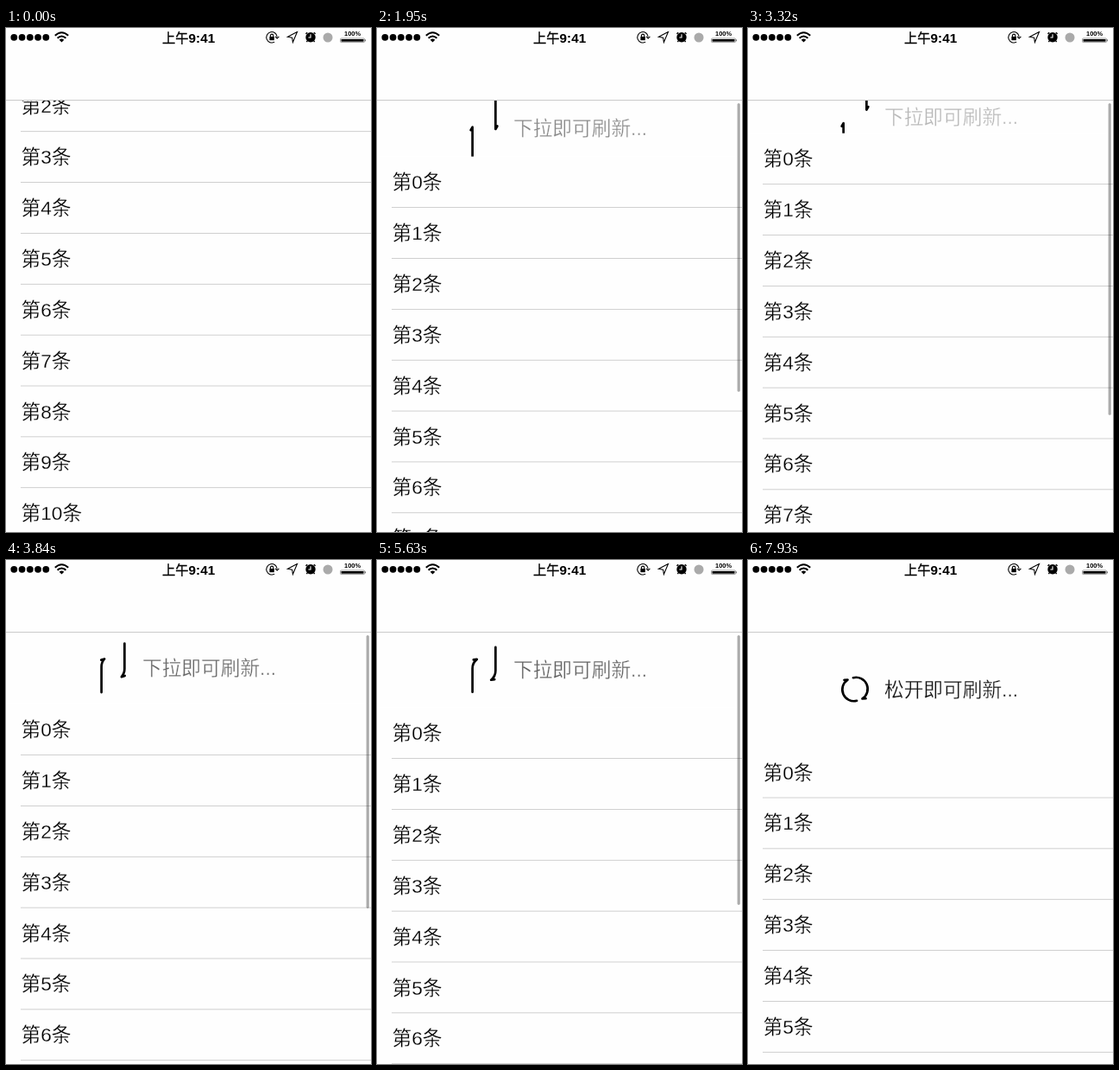
Write an HTML page that moves like this. It is 423 px wide and 583 px high and loops after 7990 ms.

```html
<!DOCTYPE html>
<html lang="zh">
<head>
<meta charset="utf-8">
<style>
html, body { margin: 0; width: 100%; height: 100%; overflow: hidden; background: #fefefe; }
svg { display: block; width: 423px; height: 583px; }
/* the pale outline thins the strokes */
text {
  font: 300 22.7px "Liberation Sans", "Noto Sans CJK SC Light", "Noto Sans CJK SC DemiLight", "Noto Sans CJK SC", "Noto Sans CJK", sans-serif;
  fill: #000; stroke: #fefefe; stroke-width: .3px;
}
.time { font-size: 15.3px; font-weight: 500; stroke: #000; }
.time tspan { font-weight: bold; stroke: none; }
.charge { font: bold 7.4px "Liberation Sans", sans-serif; stroke: none; }
.ink { fill: none; stroke: #000; }
</style>
</head>
<body>
<svg viewBox="0 0 423 583">
  <rect width="423" height="583" fill="#fefefe"/>
  <g id="icon" class="ink" stroke-width="2.7" stroke-linecap="round" stroke-linejoin="round">
    <path id="half"/>
    <use href="#half" transform="rotate(180)"/>
  </g>
  <text id="label" x="158"></text>
  <g id="list"><rect id="sheet" width="423" height="1400" fill="#fefefe"/></g>
  <rect id="bar" x="417.6" width="3.2" rx="1.6" fill="#000"/>

  <rect width="423" height="83" fill="#fefefe"/>
  <rect y="83" width="423" height="1" fill="#cbcbcb"/>
  <g id="signal"></g>
  <g class="ink" stroke-width="2">
    <path d="M56.8 8.8Q64.5 1.8 72.2 8.8M59.6 11.7Q64.5 7.3 69.4 11.7"/>
    <path d="M61.7 13.7Q64.5 11.3 67.3 13.7L64.5 16.5Z" fill="#000" stroke="none"/>
  </g>
  <text class="time" x="181" y="16.6">上午<tspan>9:41</tspan></text>
  <g class="ink" stroke-width="1.1">
    <path d="M311.2 16.1A6.2 6.2 0 1 1 314.2 10.3M312 9.8L314.2 12L316.4 9.8"/>
    <path d="M306.4 10.2V8.8A1.7 1.7 0 0 1 309.8 8.8V10.2"/>
    <rect x="305.4" y="10" width="5.4" height="4.2" fill="#000" stroke="none"/>
    <path d="M337.4 4.6L326.4 10.3L331.6 11.2L332.4 16.4Z"/>
  </g>
  <circle cx="353" cy="10.7" r="5.7"/>
  <path class="ink" stroke-width="1.5" d="M347.4 6.8L349.2 5.2M358.6 6.8L356.8 5.2M349.2 15L348.4 16.2M356.8 15L357.6 16.2"/>
  <path d="M353 7.2V11H350.4" fill="none" stroke="#fff" stroke-width="1.1"/>
  <circle cx="373" cy="11" r="5.5" fill="#aaa"/>
  <text class="charge" x="401.5" y="9" text-anchor="middle">100%</text>
  <rect x="387.5" y="12" width="28" height="4.6" rx="1" class="ink" stroke-width=".7" style="stroke:#777"/>
  <rect x="388.5" y="13" width="26" height="2.7"/>
  <rect x="416" y="13.3" width="1" height="2" fill="#777"/>
</svg>
<script>
const LOOP = 7990, TOP = 83, ROW = 58.86, PT = 1.338;
const PULL = 99 * PT, RADIUS = 10 * PT, SPACE = PT, LINE = 30 * PT, TRAVEL = 22, BARB = 3 * PT;
const RELEASE = 6950;

// [time, pull distance]; negative means scrolled into the list
const path = [
  [0, -140], [500, -140], [760, -75], [1000, -22], [1320, 0], [1670, 0], [1950, 65.5], [2290, 98],
  [2700, 28.6], [2900, 18], [3840, 83.5], [4160, 104], [4840, 28], [5630, 87.5], [5690, 91.5],
  [6600, 160.5], [6800, 168], [RELEASE, 168], [7290, 133], [LOOP, 133]
];

const $ = id => document.getElementById(id);
const clamp = v => Math.max(0, Math.min(1, v));

function add(parent, tag, attrs, text = '') {
  const el = document.createElementNS('http://www.w3.org/2000/svg', tag);
  set(el, attrs);
  el.textContent = text;
  return parent.appendChild(el);
}

function set(el, attrs) {
  for (const key in attrs) el.setAttribute(key, attrs[key]);
}

for (let i = 0; i < 5; i++) add($('signal'), 'circle', { cx: 9.3 + i * 9.25, cy: 10.8, r: 3.9 });

const rows = Array.from({ length: 14 }, (_, i) => ({
  text: add($('list'), 'text', { x: 17.5 }, `第${i}条`),
  line: add($('list'), 'rect', { x: 17, width: 406, height: 0.8, fill: '#c4c4c4' })
}));

// Monotone cubic through the points
function grade(i) {
  const [t, p] = path[i];
  return (path[i + 1][1] - p) / (path[i + 1][0] - t);
}

function slope(i) {
  if (i === 0 || i === path.length - 1) return 0;
  const a = grade(i - 1), b = grade(i);
  return a * b <= 0 ? 0 : 2 * a * b / (a + b);
}

function pullAt(t) {
  let i = 0;
  while (i < path.length - 2 && t >= path[i + 1][0]) i++;
  const [t0, p0] = path[i], [t1, p1] = path[i + 1];
  const d = t1 - t0, u = (t - t0) / d, v = 1 - u;
  return p0 * v * v * (1 + 2 * u) + p1 * u * u * (3 - 2 * u)
    + d * u * v * (slope(i) * v - slope(i + 1) * u);
}

// A line that slides in, then bends into an arc
function halfPath(g) {
  const slide = Math.max(0, 1 - 2 * g) * TRAVEL;
  const bend = Math.max(0, 2 * g - 1);
  const turn = bend * Math.PI * 0.9;
  const y = slide - SPACE;
  const endX = -RADIUS * Math.cos(turn), endY = y - RADIUS * Math.sin(turn);
  const tilt = Math.PI / 3 - turn;
  const arc = bend ? `A${RADIUS} ${RADIUS} 0 0 1 ${endX} ${endY}` : '';
  return `M${-RADIUS} ${y + LINE * (1 - bend)}V${y}${arc}`
    + `L${endX - BARB * Math.cos(tilt)} ${endY + BARB * Math.sin(tilt)}`;
}

function spinAt(t, p) {
  if (t < RELEASE) return Math.max(0, p - PULL) / PT;
  const start = (168 - PULL) / PT;
  return start + (435 - start) * (t - RELEASE) / (7930 - RELEASE);
}

function barAlpha(t) {
  if (t < 500) return 0;
  if (t < 1670) return clamp((1490 - t) / 170);
  return clamp((7600 - t) / 250);
}

function draw(t) {
  const p = pullAt(t), g = clamp(p / PULL), mid = TOP + p / 2;

  $('half').setAttribute('d', halfPath(g));
  set($('icon'), { transform: `translate(124 ${mid}) rotate(${spinAt(t, p)})` });
  set($('label'), { y: mid + 8.3, opacity: g * 0.92 });
  $('label').textContent = g >= 1 ? '松开即可刷新...' : '下拉即可刷新...';

  set($('sheet'), { y: TOP + p });
  rows.forEach(({ text, line }, i) => {
    const y = TOP + p + ROW * i;
    set(text, { y: y + ROW / 2 + 8.2 });
    set(line, { y: y + ROW - 0.28 });
  });

  set($('bar'), {
    y: 87 + Math.max(0, -p) * 0.6,
    height: 399.5 - Math.max(0, p),
    opacity: 0.33 * barAlpha(t)
  });
}

const begin = performance.now();
function tick() {
  draw((performance.now() - begin) % LOOP);
  requestAnimationFrame(tick);
}
tick();
</script>
</body>
</html>
```
